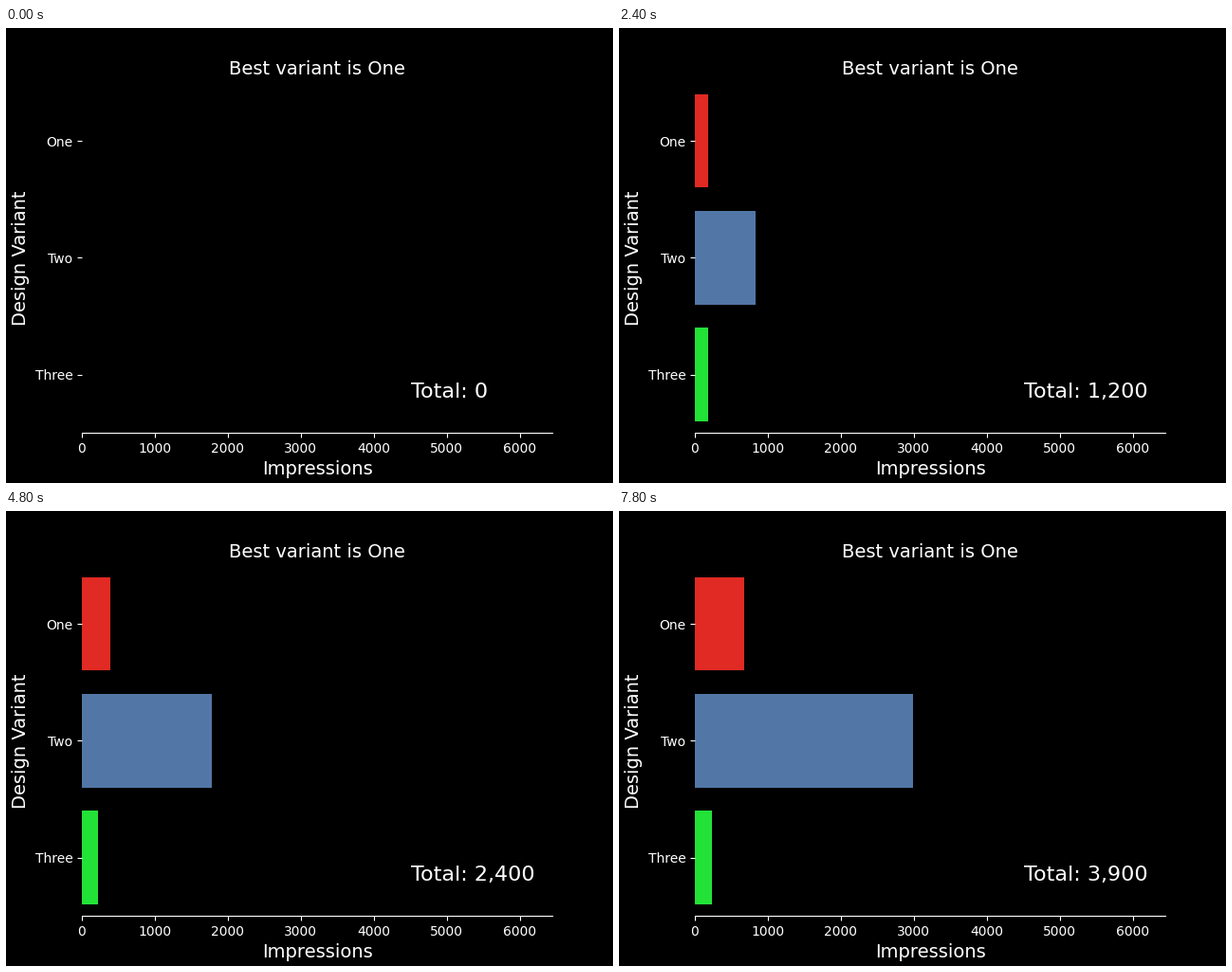
Animation of 640x480 px, one loop 8 s. Source, as a matplotlib script:

```python
import numpy as np
import matplotlib.pyplot as plt
from matplotlib.animation import FuncAnimation

FRAMES = 40
STEP = 100  # impressions added per frame
NAMES = ["One", "Two", "Three"]
COLORS = ["#e02a23", "#5277a7", "#22e238"]


def shares(frame):
    # One climbs steadily after a slow start, Three soon levels off,
    # and Two takes the rest of the total.
    one = np.interp(frame, [0, 6, 16, 36, 39], [0, 22, 283, 559, 675])
    three = np.interp(frame, [0, 6, 28, 39], [0, 170, 231, 235])
    return one, frame * STEP - one - three, three


plt.style.use("dark_background")
plt.rcParams["font.family"] = "DejaVu Sans"
fig, ax = plt.subplots(figsize=(6.4, 4.8), dpi=100)

bars = ax.barh(NAMES, [0] * 3, height=0.8, color=COLORS)
ax.set_xlim(0, 6447)
ax.set_ylim(2.5, -0.5)
ax.set_xlabel("Impressions", fontsize=14)
ax.set_ylabel("Design Variant", fontsize=14)
ax.set_title("Best variant is One", fontsize=14)
ax.spines[["left", "right", "top"]].set_visible(False)
total = ax.text(0.7, 0.102, "", fontsize=16, transform=ax.transAxes)


def update(frame):
    for bar, width in zip(bars, shares(frame)):
        bar.set_width(width)
    total.set_text(f"Total: {frame * STEP:,}")
    return [*bars, total]


anim = FuncAnimation(fig, update, frames=FRAMES, interval=200,
                     init_func=lambda: update(0), repeat=True, repeat_delay=0)
plt.show()
```
